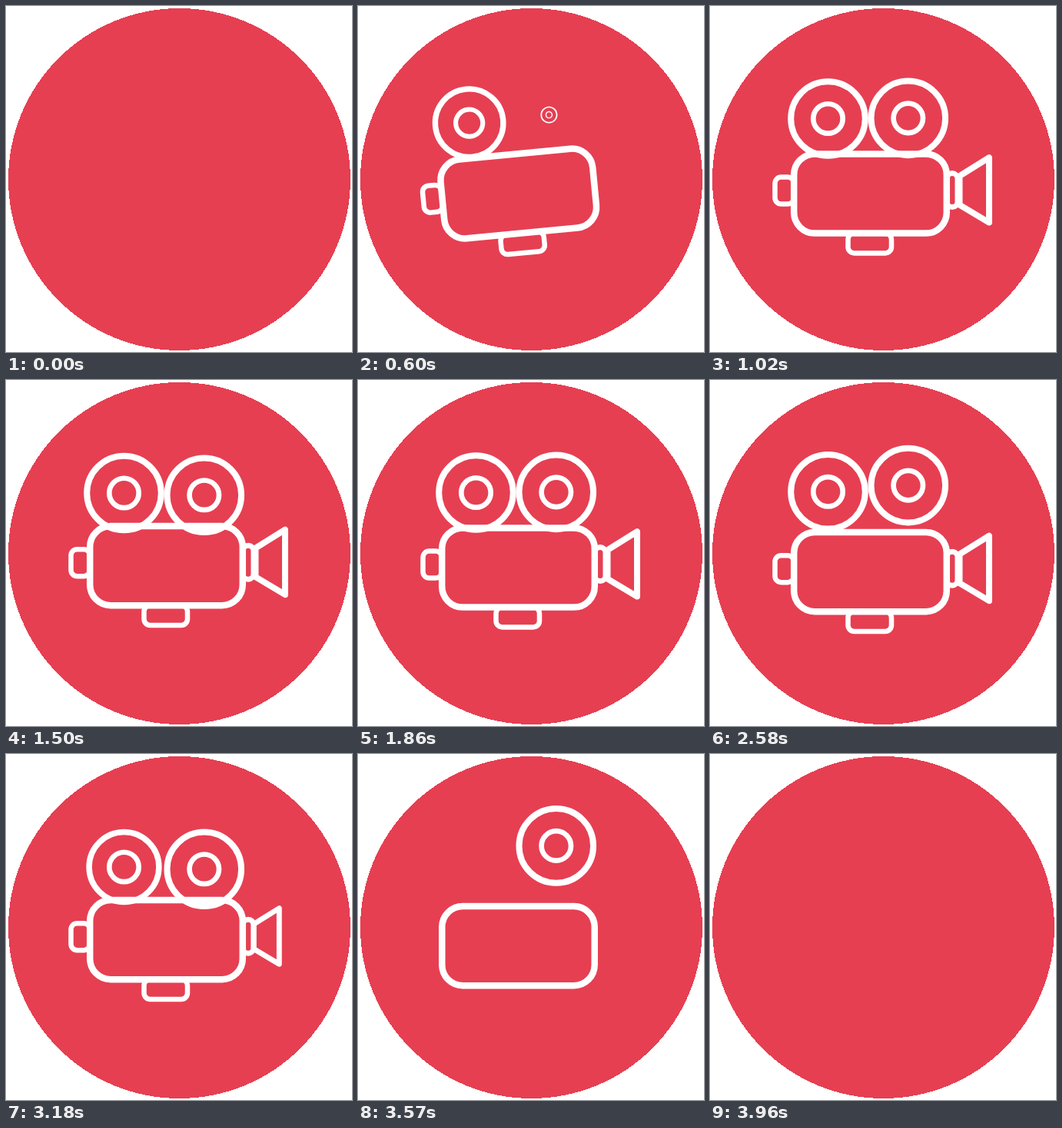
These frames come from a looping animation (450x450 px, 4.23 s). An HTML page:

```html
<!DOCTYPE html>
<html lang="en">
<head>
<meta charset="utf-8">
<title>Film camera</title>
<style>
  html, body { margin: 0; width: 100%; height: 100%; overflow: hidden; background: #fff; }
  svg { display: block; width: 100vw; height: 100vh; }
  .line { fill: none; stroke: #fff; stroke-linejoin: round; }
</style>
</head>
<body>
<svg viewBox="0 0 450 450">
  <circle cx="225.5" cy="225.5" r="222.5" fill="#e63f52" shape-rendering="crispEdges"/>
  <g id="camera" class="line">
    <g id="body">
      <rect id="back" x="84.5" y="220" width="24.5" height="35" rx="8" stroke-width="6.5"/>
      <rect id="grip" x="179.5" y="293" width="56.5" height="25.8" rx="8" stroke-width="6.5"/>
      <rect id="tube" x="308" y="215" width="14" height="44" rx="7" stroke-width="7"/>
      <path id="lens" d="M324.5 218.5 L363 194.5 V279 L324.5 256 Z" stroke-width="8"/>
      <rect x="109.2" y="189.8" width="198.6" height="103.2" rx="27" stroke-width="8.5"/>
    </g>
    <g id="left">
      <circle id="leftRim" r="48.3" stroke-width="8"/>
      <circle id="leftHub" r="19.2" stroke-width="6.7"/>
    </g>
    <g id="right">
      <circle r="48.3" stroke-width="8"/>
      <circle r="19.2" stroke-width="6.7"/>
    </g>
  </g>
</svg>
<script>
  const LOOP = 4230, BEAT = 420, PEAK = 470, LAST_PEAK = 3410;
  const CX = 208.5, CY = 241.5;
  const part = {};
  document.querySelectorAll('[id]').forEach(el => { part[el.id] = el; });

  const easeIn = u => u * u;
  const easeOut = u => 1 - (1 - u) ** 2;
  const smooth = u => u * u * (3 - 2 * u);
  const backOut = u => 1 + 2.70158 * (u - 1) ** 3 + 1.70158 * (u - 1) ** 2;

  const span = (t, from, to, ease) =>
    ease(Math.min(1, Math.max(0, (t - from) / (to - from))));

  // Grows in over the first pair of times, shrinks away over the second.
  const size = (t, [a, b], [c, d], ease = easeOut) =>
    span(t, a, b, ease) * (1 - span(t, c, d, easeIn));

  const place = (el, transform, visible) => {
    el.setAttribute('transform', transform);
    el.style.display = visible > 0.001 ? '' : 'none';
  };

  const scaleAt = (el, x, y, sx, sy) =>
    place(el, `translate(${x} ${y}) scale(${sx} ${sy}) translate(${-x} ${-y})`, Math.min(sx, sy));

  // 1 at the top of each beat, 0 halfway between; holds after the last beat.
  function bob(t) {
    const phase = (((Math.min(t, LAST_PEAK) - PEAK) / BEAT) % 1 + 1) % 1;
    return smooth(Math.abs(1 - 2 * phase));
  }

  function draw(t) {
    const beat = bob(t);
    const turn = -64 * (1 - span(t, 120, 800, easeOut));
    place(part.camera, `rotate(${turn} ${CX} ${CY})`, t > 120 && t < 3960 ? 1 : 0);

    const body = size(t, [120, 430], [3560, 3950]);
    place(part.body,
      `translate(${CX} ${CY + 8.2 * beat}) scale(${body}) translate(${-CX} ${-CY})`, body);

    const handles = size(t, [360, 540], [3330, 3480]);
    scaleAt(part.back, 109, 237.5, handles, 1);
    scaleAt(part.grip, 208, 293, 1, handles);
    scaleAt(part.tube, 306, 237, size(t, [570, 760], [3330, 3450], smooth), 1);

    const lens = size(t, [720, 980], [3110, 3300]);
    scaleAt(part.lens, 308, 237, lens, lens);

    const grow = [500, 830];
    const rim = size(t, grow, [3110, 3400], backOut);
    const hub = size(t, grow, [3180, 3420], backOut);
    place(part.left, `translate(153.5 ${147 - 1.7 * beat})`, 1);
    place(part.leftRim, `scale(${rim})`, rim);
    place(part.leftHub, `scale(${hub})`, hub);

    const reel = size(t, [586, 900], [3600, 3930], backOut);
    const lift = 13 * beat + 18 * span(t, LAST_PEAK, 3600, easeOut);
    place(part.right, `translate(257.8 ${150 - lift}) scale(${reel})`, reel);
  }

  const start = performance.now();
  function tick() {
    draw((performance.now() - start) % LOOP);
    requestAnimationFrame(tick);
  }
  draw(0);
  requestAnimationFrame(tick);
</script>
</body>
</html>
```
